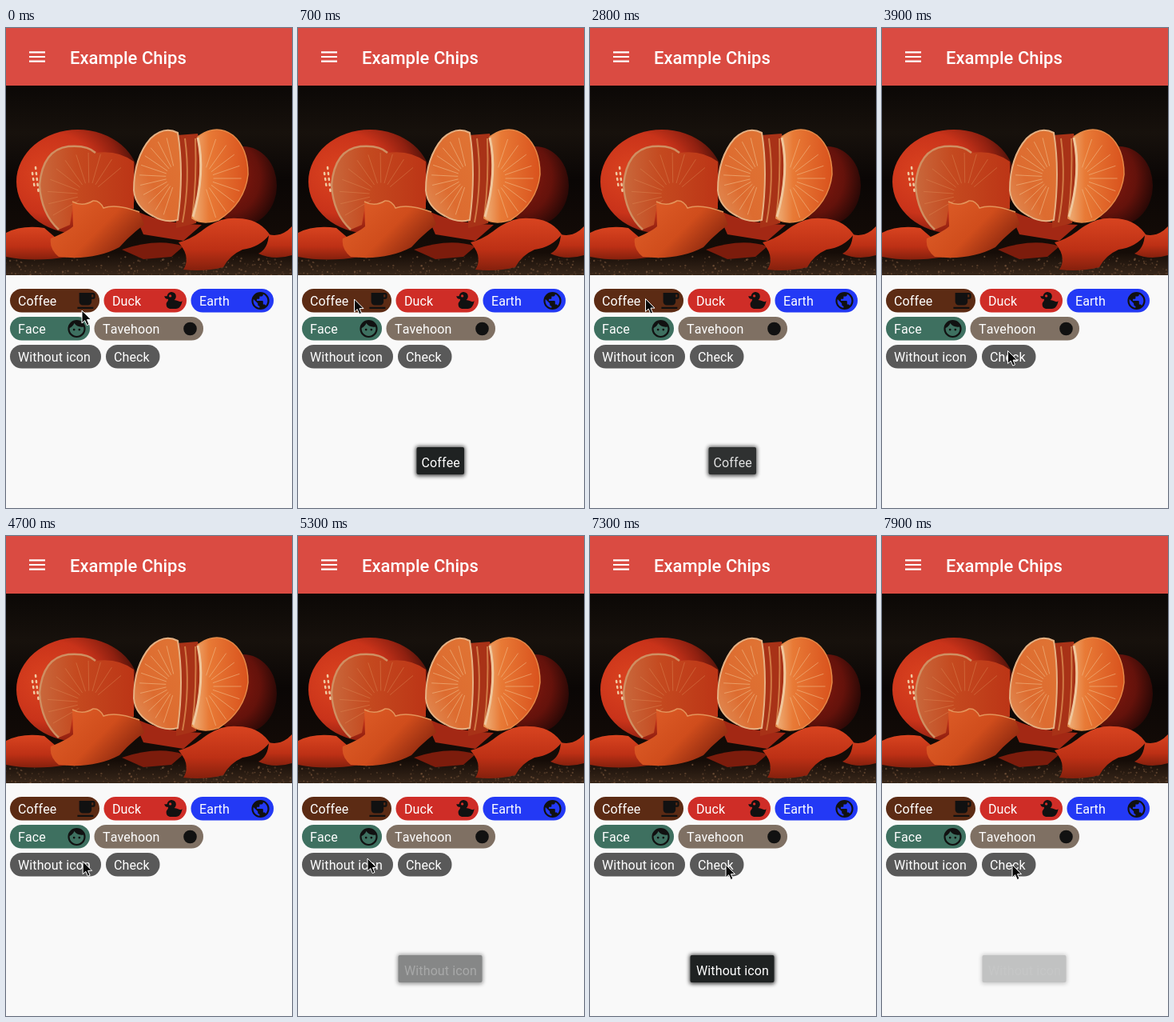
Write an HTML page that moves like this. It is 358 by 600 pixels and loops after 8000 ms.

```html
<!DOCTYPE html>
<html lang="en">
<head>
<meta charset="utf-8">
<title>Example Chips</title>
<style>
  html, body { margin: 0; width: 100%; height: 100%; overflow: hidden; background: #f9f9f9; }
  svg { display: block; position: absolute; left: 0; top: 0; }
  text { font: 16px Roboto, "Open Sans", sans-serif; fill: #fff; font-kerning: none; letter-spacing: .12px; }
  .title { font-size: 22px; font-weight: 500; letter-spacing: 0; }
  .icon { fill: #111; }
</style>
</head>
<body>
<svg id="stage" width="358" height="600" viewBox="0 0 358 600">
  <defs>
    <linearGradient id="night" x1="0" y1="0" x2="0" y2="1">
      <stop offset="0" stop-color="#0b0806"/>
      <stop offset=".25" stop-color="#17110c"/>
      <stop offset=".5" stop-color="#0a0605"/>
      <stop offset=".88" stop-color="#150c07"/>
      <stop offset="1" stop-color="#38271a"/>
    </linearGradient>
    <radialGradient id="rind" cx=".27" cy=".42" r=".78">
      <stop offset="0" stop-color="#dc4420"/>
      <stop offset=".5" stop-color="#c9331a"/>
      <stop offset=".74" stop-color="#8f2010"/>
      <stop offset="1" stop-color="#2c0b06"/>
    </radialGradient>
    <radialGradient id="shade" cx=".3" cy=".4" r=".75">
      <stop offset="0" stop-color="#86190f"/>
      <stop offset=".6" stop-color="#64120b"/>
      <stop offset="1" stop-color="#230705"/>
    </radialGradient>
    <linearGradient id="pulp" x1="0" y1="1" x2="1" y2="0">
      <stop offset="0" stop-color="#e2925c"/>
      <stop offset=".4" stop-color="#dd6c30"/>
      <stop offset="1" stop-color="#e07434"/>
    </linearGradient>
    <linearGradient id="lit" x1="0" y1="0" x2="1" y2="0">
      <stop offset="0" stop-color="#eeb07a"/>
      <stop offset=".3" stop-color="#e87a36"/>
      <stop offset="1" stop-color="#d9521d"/>
    </linearGradient>
    <linearGradient id="dim" x1="0" y1="0" x2="1" y2="0">
      <stop offset="0" stop-color="#c9683c"/>
      <stop offset=".4" stop-color="#c4491f"/>
      <stop offset="1" stop-color="#bc3516"/>
    </linearGradient>
    <linearGradient id="peel" x1="0" y1="0" x2="1" y2=".6">
      <stop offset="0" stop-color="#e0602a"/>
      <stop offset=".6" stop-color="#d04d1c"/>
      <stop offset="1" stop-color="#8a260e"/>
    </linearGradient>
    <linearGradient id="scrap" x1="0" y1="0" x2="0" y2="1">
      <stop offset="0" stop-color="#d84420"/>
      <stop offset=".6" stop-color="#bd3015"/>
      <stop offset="1" stop-color="#85200d"/>
    </linearGradient>
    <clipPath id="frame"><path d="M0 72H358V309H0Z"/></clipPath>
    <filter id="soft" x="-20%" y="-40%" width="140%" height="180%"><feGaussianBlur stdDeviation="2.5"/></filter>
  </defs>

  <path fill="#da4b42" d="M0 0H358V72H0Z"/>
  <path fill="#fff" d="M29 29.3h20v2.2H29zM29 34.9h20v2.2H29zM29 40.5h20v2.2H29z"/>
  <text class="title" x="80" y="45">Example Chips</text>

  <g clip-path="url(#frame)">
    <path fill="url(#night)" d="M0 72H358V309H0Z"/>
    <g id="grit" fill="#6b4c35"></g>
    <ellipse cx="90" cy="192" rx="77" ry="65" fill="url(#rind)"/>
    <ellipse cx="297" cy="197" rx="42" ry="49" fill="url(#shade)"/>
    <path fill="url(#scrap)" d="M0 256Q20 246 48 250L62 262 78 286Q35 293 0 286Z"/>
    <path fill="#a32814" d="M158 226Q190 244 245 246L222 266 172 258Z"/>
    <path fill="url(#dim)" d="M42 196Q46 152 78 148Q102 146 112 156Q140 152 160 167L160 226 122 224 84 222 80 246 66 252Q44 232 42 196Z"/>
    <path fill="none" stroke="#cf8f62" stroke-width="2.5" d="M66 252Q44 232 42 196Q46 152 78 148Q102 146 112 156"/>
    <g id="dimRays" stroke="#dc8a56" opacity=".45"></g>
    <path fill="url(#peel)" d="M83 217Q96 224 109 216Q117 215 122 225Q138 219 167 230L173 246Q156 258 142 274Q110 291 66 286Q54 276 56 263Q76 255 84 248Z"/>
    <path fill="none" stroke="#e3935a" stroke-width="1.5" d="M83 217Q96 224 109 216Q117 215 122 225Q138 219 167 230"/>
    <path fill="#a83217" d="M214 134L240 132 250 170 238 244 213 250Z"/>
    <path fill="none" stroke="#d07a45" stroke-width="2" d="M224 138Q231 190 221 243M237 138Q239 190 233 238"/>
    <path fill="url(#pulp)" stroke="#e6b183" stroke-width="2"
      d="M160 203Q160 162 181 138Q198 122 215 131Q223 180 215 240Q199 244 184 235Q162 224 160 203Z"/>
    <path fill="url(#lit)" stroke="#e58a48" stroke-width="1.5"
      d="M240 136Q263 119 284 134Q303 150 303 183Q299 219 266 240Q246 247 233 238Q249 190 240 136Z"/>
    <path fill="none" stroke="#efc79c" stroke-width="3" d="M240 137Q250 180 234 236"/>
    <g id="rays" stroke="#f2bd88" opacity=".6"></g>
    <path fill="#7c1c0c" d="M145 277Q190 262 222 273L207 286 172 289Z"/>
    <path fill="url(#scrap)" d="M216 268Q232 264 247 252Q268 236 290 238Q316 238 330 258Q318 274 296 277Q280 284 272 299Q248 305 222 302Q232 286 216 268Z"/>
    <path fill="url(#scrap)" d="M329 258Q345 262 358 248V284Q335 291 316 282Q328 276 329 258Z"/>
    <path stroke="#f0c8a0" stroke-width="2.5" stroke-dasharray="2 5" stroke-linecap="round" fill="none" d="M37 174L41 208M33 181L36 201"/>
  </g>

  <g id="chips"></g>
  <g id="toasts"></g>
  <path id="cursor" d="M0 0V16L3.7 12.6 6.3 18.6 9 17.4 6.5 11.6H11.5Z" fill="#080808" stroke="#fff" stroke-width="1"/>
</svg>
<script>
const NS = "http://www.w3.org/2000/svg";
const LOOP = 8000, STEP = 100, FADE = 400, HOLD = 2510;
const byId = id => document.getElementById(id);

function add(parent, tag, attrs, content = "") {
  const el = document.createElementNS(NS, tag);
  for (const key in attrs) el.setAttribute(key, attrs[key]);
  el.textContent = content;
  parent.append(el);
  return el;
}

// Membrane lines fanning out of a segment's core
function fan(parent, x, y, rx, ry, from, to, count) {
  for (let i = 0; i < count; i++) {
    const a = (from + (to - from) * i / (count - 1)) * Math.PI / 180;
    const at = k => `${x + rx * k * Math.cos(a)} ${y + ry * k * Math.sin(a)}`;
    add(parent, "path", { d: `M${at(.25)}L${at(.9)}` });
  }
}
fan(byId("rays"), 213, 186, 51, 56, 110, 255, 11);
fan(byId("rays"), 246, 188, 54, 58, -70, 70, 9);
fan(byId("dimRays"), 104, 208, 58, 58, 150, 320, 11);

let seed = 7;
const random = () => (seed = seed * 16807 % 2147483647) / 2147483647;
for (let i = 0; i < 260; i++) {
  add(byId("grit"), "circle", {
    cx: random() * 358, cy: 309 - 24 * random() ** 1.5, r: .5 + random() * .8, opacity: .3 + random() * .6
  });
}

const icons = {
  coffee: "M2,21H20V19H2M20,8H18V5H20M20,3H4V13A4,4 0 0,0 8,17H14A4,4 0 0,0 18,13V10H20A2,2 0 0,0 22,8V5C22,3.89 21.1,3 20,3Z",
  duck: "M8.5,5A1.5,1.5 0 0,0 7,6.5A1.5,1.5 0 0,0 8.5,8A1.5,1.5 0 0,0 10,6.5A1.5,1.5 0 0,0 8.5,5M10,2A5,5 0 0,1 15,7C15,8.7 14.15,10.2 12.86,11.1C14.44,11.25 16.22,11.61 18,12.5C21,14 22,12 22,12C22,12 21,21 15,21H9C9,21 4,21 4,16C4,13 7,12 6,10C2,10 2,6.5 2,6.5C3,7 4.24,7 5,6.65C5.19,4.05 7.36,2 10,2Z",
  earth: "M17.9,17.39C17.64,16.59 16.89,16 16,16H15V13A1,1 0 0,0 14,12H8V10H10A1,1 0 0,0 11,9V7H13A2,2 0 0,0 15,5V4.59C17.93,5.77 20,8.64 20,12C20,14.08 19.2,15.97 17.9,17.39M11,19.93C7.05,19.44 4,16.08 4,12C4,11.38 4.08,10.78 4.21,10.21L9,15V16A2,2 0 0,0 11,18M12,2A10,10 0 0,0 2,12A10,10 0 0,0 12,22A10,10 0 0,0 22,12A10,10 0 0,0 12,2Z",
  face: "M9,11.75A1.25,1.25 0 0,0 7.75,13A1.25,1.25 0 0,0 9,14.25A1.25,1.25 0 0,0 10.25,13A1.25,1.25 0 0,0 9,11.75M15,11.75A1.25,1.25 0 0,0 13.75,13A1.25,1.25 0 0,0 15,14.25A1.25,1.25 0 0,0 16.25,13A1.25,1.25 0 0,0 15,11.75M12,2A10,10 0 0,0 2,12A10,10 0 0,0 12,22A10,10 0 0,0 22,12A10,10 0 0,0 12,2M12,20C7.59,20 4,16.41 4,12C4,11.71 4,11.42 4.05,11.14C6.41,10.09 8.28,8.16 9.26,5.77C11.07,8.33 14.05,10 17.42,10C18.2,10 18.95,9.91 19.67,9.74C19.88,10.45 20,11.21 20,12C20,16.41 16.41,20 12,20Z",
  dot: "M12,4.5A7.5,7.5 0 0,0 12,19.5A7.5,7.5 0 0,0 12,4.5Z"
};

// label, left, right, top, colour, icon
const chips = [
  ["Coffee", 5, 117, 326, "#5c2b14", "coffee"],
  ["Duck", 122.5, 226, 326, "#cf2d27", "duck"],
  ["Earth", 231.5, 335, 326, "#2339f5", "earth"],
  ["Face", 5, 105, 361, "#3e7060", "face"],
  ["Tavehoon", 110.5, 247, 361, "#7f7063", "dot"],
  ["Without icon", 5, 119, 396, "#595959"],
  ["Check", 125, 192.5, 396, "#595959"]
];
for (const [label, left, right, top, fill, icon] of chips) {
  const box = byId("chips");
  add(box, "rect", { x: left, y: top, width: right - left, height: 29.5, rx: 14.75, fill });
  add(box, "text", { x: Math.round(left + 10), y: top + 21 }, label);
  if (!icon) continue;
  add(box, "path", {
    class: "icon", d: icons[icon],
    transform: `translate(${right - 16.5} ${top + 15}) scale(1.11) translate(-12 -12)`
  });
}

function makeToast(label, left, right, start) {
  const root = byId("toasts"), width = right - left;
  const card = add(root, "g", {});
  add(card, "rect", { x: left - 1, y: 523, width: width + 2, height: 37, rx: 3, fill: "#000", opacity: .75, filter: "url(#soft)" });
  add(card, "rect", { x: left, y: 524, width, height: 34, rx: 2, fill: "#1f2222" });
  const text = add(root, "text", { x: (left + right) / 2 + .5, y: 549, "text-anchor": "middle" }, label);
  return { card, text, start };
}
const toasts = [
  makeToast("Coffee", 148.5, 208, 260),
  makeToast("Without icon", 125.5, 230.5, 5090)
];

// time, x, y of the pointer tip
const path = [
  [0, 95, 353], [200, 70.5, 339], [2200, 70.5, 339], [2800, 69.5, 338.5],
  [3100, 72, 340], [3700, 152, 400], [3900, 157.5, 403.5], [4200, 148, 428],
  [4800, 92, 405], [5000, 87, 403], [5600, 87, 403], [6200, 172, 409],
  [6500, 179.5, 411], [7300, 170, 411], [7700, 163, 411], [LOOP, 163, 411]
];
function pointAt(t) {
  const i = path.findIndex(p => p[0] > t);
  const [t0, x0, y0] = path[i - 1], [t1, x1, y1] = path[i];
  const k = (t - t0) / (t1 - t0), e = k * k * (3 - 2 * k);
  return [x0 + (x1 - x0) * e, y0 + (y1 - y0) * e];
}

const clamp = v => Math.min(1, Math.max(0, v));
function draw(now) {
  const t = Math.floor(now % LOOP / STEP) * STEP;
  for (const { card, text, start } of toasts) {
    const age = t - start;
    const a = Math.min(clamp(age / FADE), clamp((HOLD + FADE - age) / FADE));
    card.setAttribute("opacity", a);
    text.setAttribute("opacity", a * a);
  }
  byId("cursor").setAttribute("transform", `translate(${pointAt(t)})`);
}

const begin = performance.now();
function tick() {
  draw(performance.now() - begin);
  requestAnimationFrame(tick);
}
tick();
</script>
</body>
</html>
```
